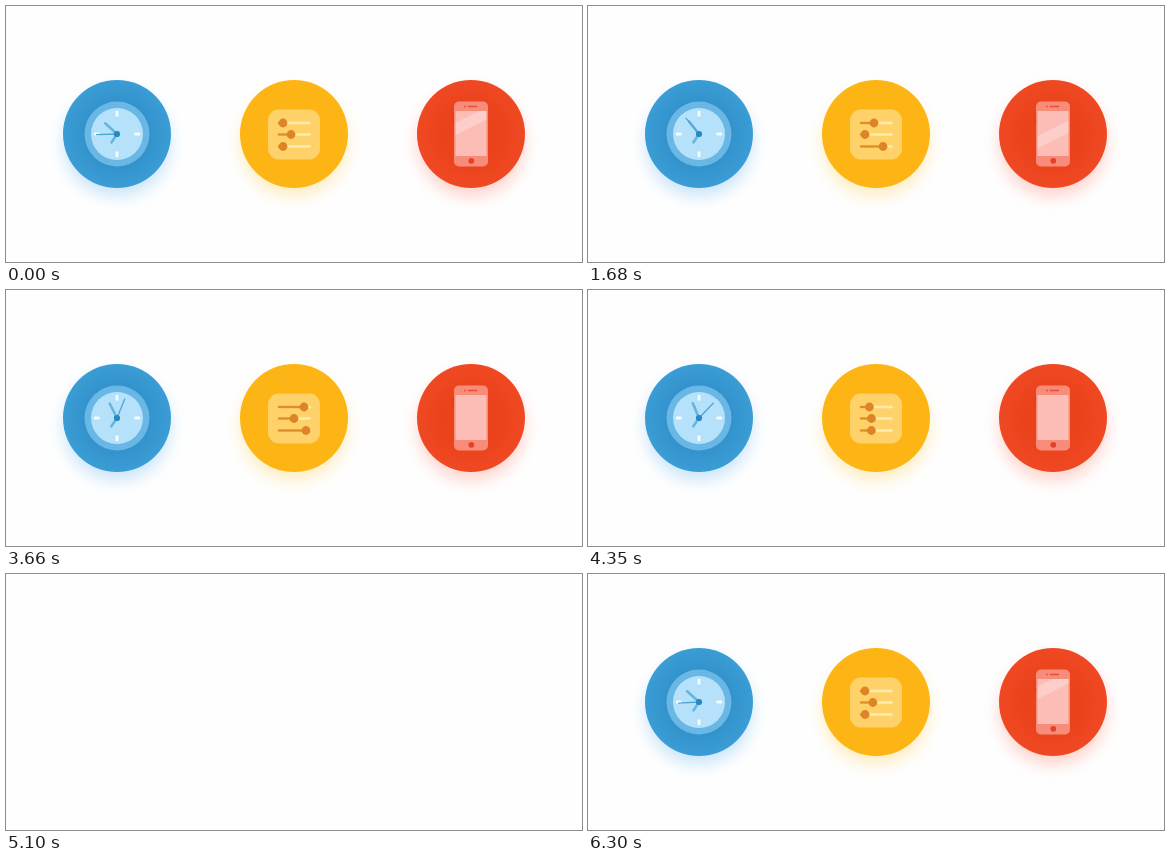
Animation, 576 px wide and 256 px high, one loop 6330 ms. Source, as an HTML page with a canvas:

```html
<!DOCTYPE html>
<html lang="en">
<head>
<meta charset="utf-8">
<title>Clock, sliders, phone</title>
<style>
  html, body { margin: 0; height: 100%; overflow: hidden; background: #fefefe; }
  canvas { display: block; }
</style>
</head>
<body>
<canvas width="576" height="256"></canvas>
<script>
const ctx = document.querySelector('canvas').getContext('2d');
const LOOP = 6330, LEAD = 630, FADE = 600, FADE_OUT = 5130;

// Knob x positions, [ms since fade-in began, x]
const sliders = [
  { y: 117, keys: [[0, 276], [630, 277], [2310, 286], [4290, 298], [5310, 276], [LOOP, 276]] },
  { y: 128.5, keys: [[0, 276], [240, 276.5], [630, 285], [2310, 277], [4290, 288], [5310, 282], [LOOP, 276]] },
  { y: 140.5, keys: [[0, 288], [240, 286], [630, 277], [2310, 295], [4290, 300], [5310, 278], [LOOP, 288]] }
];

function ease(keys, time) {
  const i = keys.findIndex(k => k[0] > time);
  const [t0, a] = keys[i - 1], [t1, b] = keys[i];
  const p = (time - t0) / (t1 - t0);
  return a + (b - a) * p * p * (3 - 2 * p);
}

function disc(x, y, r, color) {
  ctx.fillStyle = color;
  ctx.beginPath();
  ctx.arc(x, y, r, 0, 2 * Math.PI);
  ctx.fill();
}

function box(x, y, w, h, r, color) {
  ctx.fillStyle = color;
  ctx.beginPath();
  ctx.roundRect(x, y, w, h, r);
  ctx.fill();
}

function line(x1, y1, x2, y2, width, color, cap = 'round') {
  ctx.strokeStyle = color;
  ctx.lineWidth = width;
  ctx.lineCap = cap;
  ctx.beginPath();
  ctx.moveTo(x1, y1);
  ctx.lineTo(x2, y2);
  ctx.stroke();
}

function badge(x, inner, outer, shadow) {
  const shade = ctx.createRadialGradient(x, 128, 26, x, 128, 54);
  shade.addColorStop(0, inner);
  shade.addColorStop(1, outer);
  ctx.save();
  ctx.shadowColor = shadow;
  ctx.shadowBlur = 15;
  ctx.shadowOffsetY = 9;
  disc(x, 128, 54, shade);
  ctx.restore();
}

function hand(degrees, length, width, color) {
  const a = degrees * Math.PI / 180;
  line(111, 128, 111 + length * Math.sin(a), 128 - length * Math.cos(a), width, color);
}

function clock(time) {
  badge(111, '#318fc9', '#3b9dd5', 'rgba(70,165,235,.27)');
  disc(111, 128, 32.5, '#69b7e4');
  disc(111, 128, 26, '#b5e2fa');
  for (const [dx, dy] of [[0, -1], [1, 0], [0, 1], [-1, 0]])
    line(111 + dx * 17.5, 128 + dy * 17.5, 111 + dx * 23, 128 + dy * 23, 2.8, '#f8fdff', 'butt');
  hand(213 + time * .0004, 10, 2.6, '#68b4df');
  hand(312 + time * .0058, 16, 2.6, '#68b4df');
  hand(268 + time * .0312, 20.5, 1.3, '#4fa4d7');
  disc(111, 128, 3.1, '#2b87c1');
}

function settings(time) {
  badge(288, '#fdb415', '#fdb515', 'rgba(255,200,60,.3)');
  box(262, 103.5, 52, 50, 11, '#fed269');
  for (const { y, keys } of sliders) {
    const x = ease(keys, time);
    line(273, y, 303.5, y, 2.6, '#ffebb0');
    line(273, y, x, y, 2.6, '#df8e25');
    disc(x, y, 4.4, '#dc8426');
  }
}

function phone(time) {
  badge(465, '#ea421b', '#ef4923', 'rgba(255,100,75,.27)');
  box(446.7, 107, 2, 4, 1, '#dc3c20');
  box(446.7, 114, 2, 4, 1, '#dc3c20');
  box(448, 95.5, 34, 65, 5, '#f78c7b');
  box(449.5, 105, 31, 45, 0, '#fbbdb6');
  line(462.5, 100.5, 470.5, 100.5, 1.5, '#e94b32');
  disc(459, 100.5, .9, '#e94b32');
  disc(465.3, 154.8, 2.9, '#e5402a');

  // Diagonal glare sweeping down the screen
  const y = 62 + (time + 390) % (LOOP / 4) * .136;
  ctx.save();
  ctx.beginPath();
  ctx.rect(449.5, 105, 31, 45);
  ctx.clip();
  line(440, y + 12.5, 490, y - 12.5, 11, 'rgba(255,255,255,.26)', 'butt');
  ctx.restore();
}

function draw(now) {
  const time = now % LOOP;
  const stage = (time + LEAD) % LOOP;
  const alpha = Math.max(0, Math.min(1, stage / FADE, (FADE_OUT + FADE - stage) / FADE));
  const handTime = stage - LEAD;

  ctx.fillStyle = '#fefefe';
  ctx.fillRect(0, 0, 576, 256);
  clock(handTime);
  settings(stage);
  phone(time);
  ctx.fillStyle = `rgba(254,254,254,${1 - alpha})`;
  ctx.fillRect(0, 0, 576, 256);
}

const start = performance.now();
function tick() {
  draw(performance.now() - start);
  requestAnimationFrame(tick);
}
tick();
</script>
</body>
</html>
```
